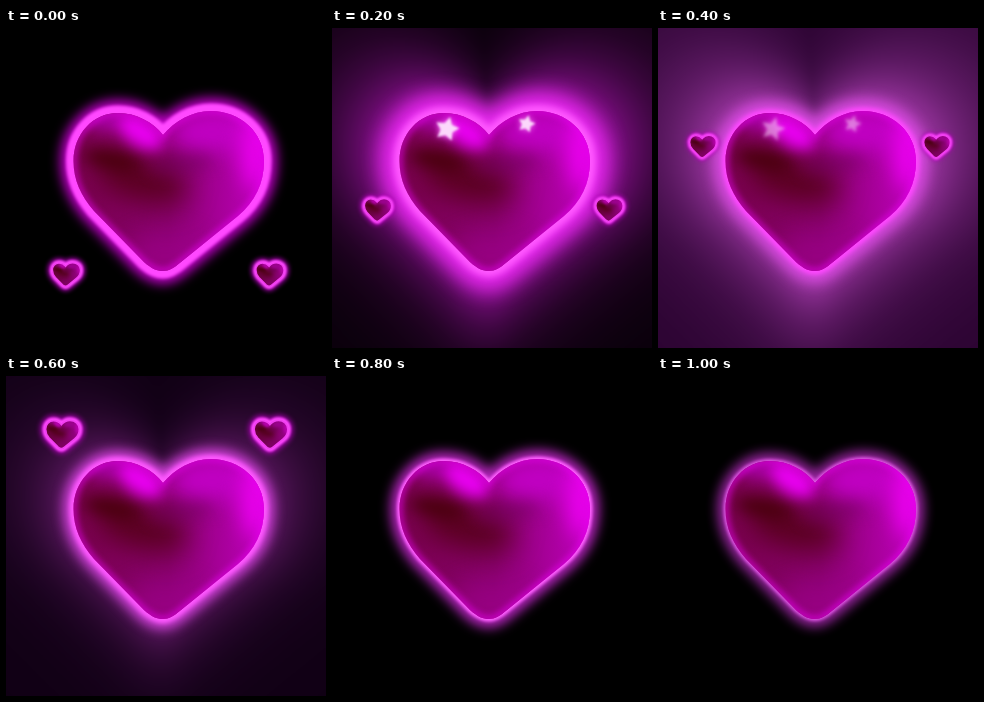
Animation of 320 by 320 pixels, one loop 1200 ms. Source, as an HTML page:

```html
<!DOCTYPE html>
<html lang="en">
<head>
<meta charset="utf-8">
<title>Glowing heart</title>
<style>
  html, body { margin: 0; width: 100%; height: 100%; overflow: hidden; background: #000; }
  svg { display: block; width: 100%; height: 100%; }
</style>
</head>
<body>
<svg viewBox="0 0 320 320">
  <defs>
    <path id="heart" d="M157 107C147 94 130 85 112 85C87 85 67.500 106 67.500 133C67.500 152 75 168 88 183L138 234C146 241 151 243 157 243C163 243 168 240 175 234L232 188C249 174 258 155 258 133C258 104 234 83 205 83C186 83 169 93 157 107Z"/>
    <clipPath id="inside"><use href="#heart"/></clipPath>
    <linearGradient id="base" x1="0" y1="0" x2="1" y2="0">
      <stop offset="0" stop-color="#78004c"/>
      <stop offset=".5" stop-color="#88006c"/>
      <stop offset="1" stop-color="#c400c4"/>
    </linearGradient>
    <g id="body" clip-path="url(#inside)">
      <rect x="60" y="75" width="205" height="175" fill="url(#base)"/>
      <ellipse cx="160" cy="228" rx="44" ry="24" fill="#a00090" opacity=".6" style="filter:blur(12px)"/>
      <ellipse cx="207" cy="104" rx="44" ry="22" fill="#c000c2" style="filter:blur(11px)"/>
      <ellipse cx="250" cy="124" rx="16" ry="38" fill="#e800ec" style="filter:blur(10px)"/>
      <ellipse cx="136" cy="153" rx="48" ry="20" fill="#58001c" transform="rotate(14 136 153)" style="filter:blur(14px)"/>
      <ellipse cx="106" cy="132" rx="30" ry="10" fill="#48000a" transform="rotate(12 106 132)" style="filter:blur(8px)"/>
      <ellipse cx="176" cy="136" rx="34" ry="8" fill="#700058" opacity=".6" transform="rotate(-8 176 136)" style="filter:blur(8px)"/>
      <ellipse cx="104" cy="92" rx="26" ry="10" fill="#a800a4" style="filter:blur(7px)"/>
      <ellipse cx="135" cy="104" rx="25" ry="14" fill="#e800f0" transform="rotate(32 135 104)" style="filter:blur(7px)"/>
      <use href="#heart" fill="none" stroke="#e800f0" stroke-width="6" opacity=".65" style="filter:blur(3px)"/>
    </g>
  </defs>
  <g id="field" style="filter:blur(3px)"></g>
  <g id="glow"></g>
  <use href="#body"/>
  <g id="stars"></g>
  <g id="minis"></g>
</svg>
<script>
const STEP = 200;
const $ = id => document.getElementById(id);

// Glow layers: [stroke width, blur, colour, opacity]
const poses = [
  { glow: [[26, 6, '#c000c8', 1], [15, 1.8, '#ff48ff', 1]],
    mini: { y: 246.5, xs: [60.5, 264], size: .148, ring: 36, halo: 68 } },
  { field: { near: [208, 24, 216], far: [8, 0, 9], reach: .55 },
    glow: [[36, 10, '#e428ec', 1], [12, 3, '#ff58ff', 1]],
    star: { inner: .5, opacity: 1, soft: 1.2 },
    mini: { y: 182, xs: [46, 277.5], size: .143, ring: 32, halo: 60 } },
  { field: { near: [188, 68, 194], far: [42, 3, 48], reach: .62 },
    glow: [[22, 7, '#d848e0', 1], [7, 2, '#ff48ff', 1]],
    star: { inner: .42, opacity: .55, soft: 1.7 },
    mini: { y: 118.500, xs: [45, 279], size: .14, ring: 28, halo: 48 } },
  { field: { near: [112, 30, 118], far: [16, 0, 20], reach: .44 },
    glow: [[20, 6, '#d040d8', 1], [8, 2, '#ff58ff', 1]],
    mini: { y: 58.500, xs: [56.500, 265], size: .178, ring: 34, halo: 62 } },
  { glow: [[18, 6, '#b424bc', 1], [5, 1.6, '#ff60ff', 1]] },
  { glow: [[16, 6, '#a828b0', .9], [4, 1.6, '#f060f4', .8]] }
];

// Nested hearts, largest first, whose colour decays with their scale
function field({ near, far, reach }) {
  let hearts = `<rect x="-20" y="-20" width="360" height="360" fill="rgb(${far})"/>`;
  for (let s = 4; s >= 1; s -= s > 2 ? .06 : .03) {
    const k = Math.exp((1 - s) / reach);
    const colour = near.map((n, i) => Math.round(far[i] + (n - far[i]) * k));
    hearts += `<use href="#heart" fill="rgb(${colour})"
      transform="translate(160 160) scale(${s}) translate(-160 -160)"/>`;
  }
  return hearts;
}

const outline = ([width, blur, colour, opacity]) =>
  `<use href="#heart" fill="${colour}" stroke="${colour}" stroke-width="${width}"
    stroke-linejoin="round" opacity="${opacity}" style="filter:blur(${blur}px)"/>`;

const outlines = layers => layers.map(outline).join('');

function starPoints(cx, cy, r, inner) {
  return Array.from({ length: 10 }, (_, i) => {
    const a = -Math.PI / 2 + .25 + i * Math.PI / 5;
    const d = i % 2 ? r * inner : r;
    return `${cx + d * Math.cos(a)},${cy + d * Math.sin(a)}`;
  }).join(' ');
}

function star(cx, cy, r, { inner, opacity, soft }) {
  const points = starPoints(cx, cy, r, inner);
  return `<g opacity="${opacity}">
    <polygon points="${points}" fill="#ff80ff" style="filter:blur(3px)"/>
    <polygon points="${points}" fill="#fbd8fb" style="filter:blur(${soft}px)"/></g>`;
}

function miniHeart(x, { y, size, ring, halo }) {
  return `<g transform="translate(${x} ${y}) scale(${size}) translate(-163 -163)">
    ${outlines([[halo, 16, '#b000b8', .8], [ring, 6, '#ff48ff', 1]])}
    <use href="#body"/>
    <use href="#heart" fill="#480418" opacity=".3"/>
    <use href="#heart" fill="none" stroke="#f040f0" stroke-width="10" style="filter:blur(4px)"/></g>`;
}

function show(p) {
  $('field').innerHTML = p.field ? field(p.field) : '';
  $('glow').innerHTML = outlines(p.glow);
  $('stars').innerHTML = p.star ? star(115, 101, 12.5, p.star) + star(194.5, 96, 9, p.star) : '';
  $('minis').innerHTML = p.mini ? p.mini.xs.map(x => miniHeart(x, p.mini)).join('') : '';
}

let current = -1;
const start = performance.now();

function tick() {
  const index = Math.floor((performance.now() - start) / STEP) % poses.length;
  if (index !== current) show(poses[current = index]);
  requestAnimationFrame(tick);
}
tick();
</script>
</body>
</html>
```
